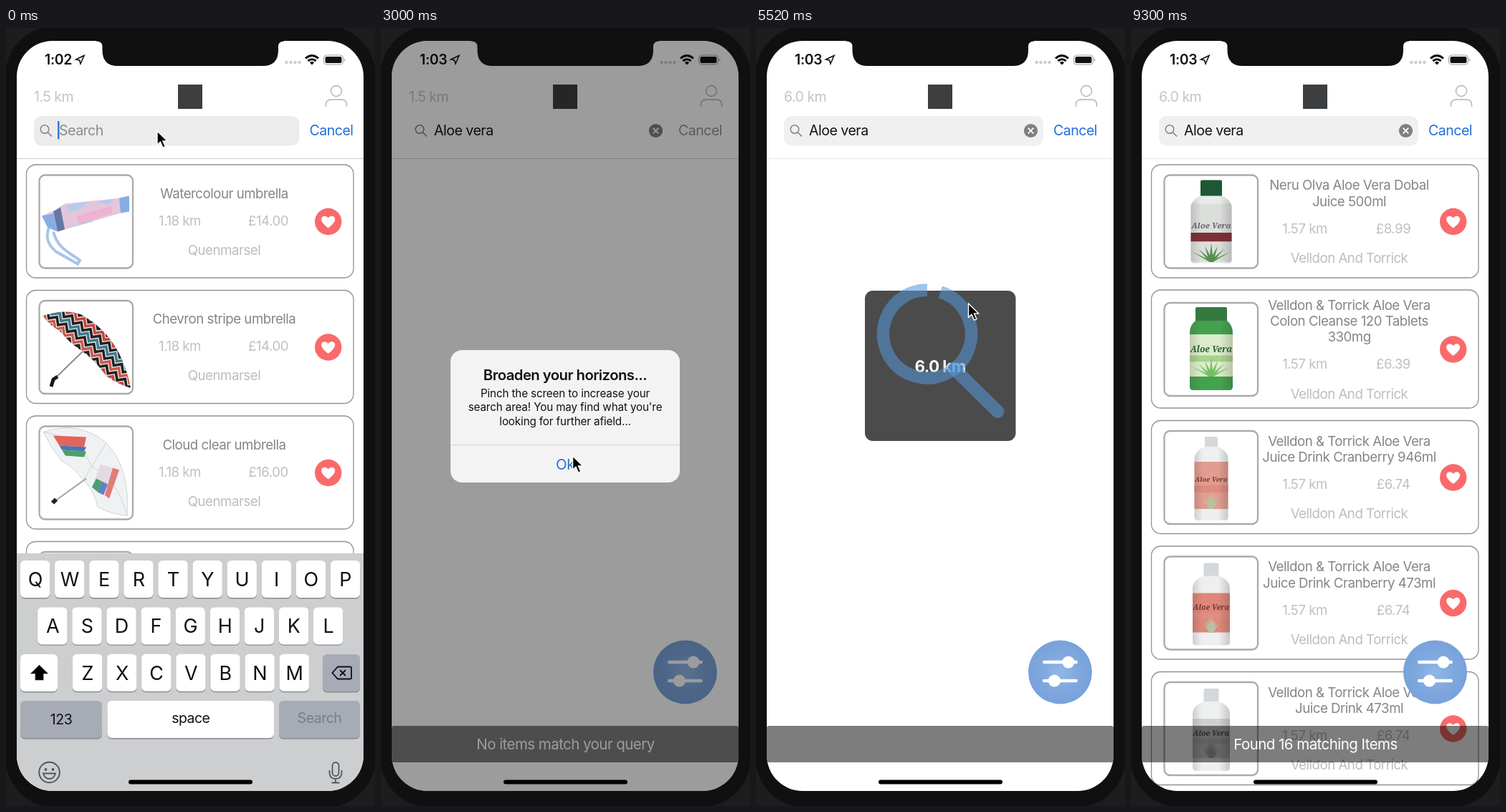
An HTML page with a canvas for the animation above (9360 ms loop, 515 px wide and 1087 px high).

```html
<!DOCTYPE html>
<html lang="en">
<head>
<meta charset="utf-8">
<title>Local stock search</title>
<style>
html, body { margin: 0; width: 100%; height: 100%; overflow: hidden; background: #1c1d1d; }
canvas { display: block; width: 515px; height: 1087px; }
</style>
</head>
<body>
<canvas id="stage" width="515" height="1087"></canvas>
<script>
const LOOP = 9360;
const c = document.getElementById('stage').getContext('2d');

// Drawing helpers
const clamp = (v, a = 0, b = 1) => Math.min(b, Math.max(a, v));
const ramp = (t, from, to) => clamp((t - from) / (to - from));
const ease = p => p * p * (3 - 2 * p);

function paint(shape, fill, stroke, width = 1) {
  if (fill) { c.fillStyle = fill; c.fill(shape); }
  if (stroke) { c.strokeStyle = stroke; c.lineWidth = width; c.stroke(shape); }
}
function box(x, y, w, h, r, fill, stroke, width) {
  const p = new Path2D();
  p.roundRect(x, y, w, h, r);
  paint(p, fill, stroke, width);
}
function dot(x, y, r, fill, stroke, width) {
  const p = new Path2D();
  p.arc(x, y, r, 0, Math.PI * 2);
  paint(p, fill, stroke, width);
}
function path(d, fill, stroke, width) { paint(new Path2D(d), fill, stroke, width); }
function text(s, x, y, size, color, align = 'center', weight = 400, track = -.027, family = 'Inter, sans-serif') {
  c.font = `${weight} ${size}px ${family}`;
  c.letterSpacing = `${track * size}px`;
  c.textAlign = align;
  c.fillStyle = color;
  c.fillText(s, x, y);
}
function at(x, y, draw, scale = 1) {
  c.save();
  c.translate(x, y);
  c.scale(scale, scale);
  draw();
  c.restore();
}
function fade(alpha, draw) {
  if (alpha <= 0) return;
  c.save();
  c.globalAlpha = alpha;
  draw();
  c.restore();
}

// Product pictures, drawn around the centre of their frame
function foldedUmbrella() {
  path('M-52 8C-58 24-52 34-42 42L-12 59L-9 54C-22 44-40 38-46 14', null, '#a9c4ea', 4);
  path('M-62-8L-44-16L-30-25L48-33L60-36V-14L48-12L-40 14L-54 8Z', '#e3c6dc');
  path('M-62-8L-46-11L-40 14L-54 8ZM46-33L60-36V-14L48-12Z', '#86aee2');
  path('M-46-14L-36-20L-30 11L-40 14Z', '#6577a6');
  path('M-28-22L2-28L-8-18L-24-14ZM14-27L40-32L32-24ZM-22 8L4-2L10 0Z', '#b3cbec');
  path('M-14-8L36-22V-12L-10 4Z', '#edb3d1');
}
function stripedUmbrella() {
  path('M-4 5L-42 42', null, '#8c8c8c', 2);
  path('M-40 41L-46 45L-49 55', null, '#181818', 5);
  c.save();
  const canopy = new Path2D('M-61-44Q-30-54-8-46Q48-16 62 57Q40 50 28 40Q10 16-5 6Q-26-8-36-22Q-50-30-61-44Z');
  paint(canopy, '#eee8e6');
  c.clip(canopy);
  c.rotate(Math.PI / 5);
  const colors = ['#222', '#c6453d', '#222', '#3d7a90', '#222', '#d0574a'];
  for (let i = 0; i < 20; i++) {
    let d = `M-90 ${i * 7 - 80}`;
    for (let k = 1; k < 24; k++) d += `L${k * 8 - 90} ${i * 7 - 80 + k % 2 * 8}`;
    path(d, null, colors[i % 6], 3.6);
  }
  c.restore();
}
function clearUmbrella() {
  path('M-60-57Q-10-74 28-42Q62-6 57 60Q36 58 16 48Q12 26-4 10Q-22-12-34-16Q-50-36-60-57Z', '#f0f1f2', '#d2d4d6', 1);
  path('M0 8L-42 38', null, '#a0a0a0', 2);
  path('M-42 37L-47 42', null, '#222', 6);
  path('M-60-57Q-10-50 8-8M28-42L-4 10M8-8Q44 10 57 60', null, '#cfd1d4', 1);
  [['#e2655d', 0, 14], ['#4a74b8', 14, 6], ['#4ba06c', 20, 8]].forEach(([color, y, h]) =>
    path(`M${-46 + y * .6} ${y - 52}L0 ${y - 50}L-3 ${y + h - 50}L${-46 + (y + h) * .6} ${y + h - 52}Z`, color));
  path('M20-12L46-4L32 36L8 20Z', '#e4dbe2');
  path('M14 8L22 12L16 27L8 20Z', '#4ba06c');
  path('M22 12L30 16L24 31L16 27Z', '#5e83c0');
  path('M37-7L46-4L32 36L26 31Z', '#df7d78');
}
function bottle({ w, top, bottom, cap, capW, capH, body, label, from, to, band, leaf, spread, ink }) {
  const shoulder = top + capH, r = w / 2, size = to - from;
  const shade = c.createLinearGradient(-r, 0, r, 0);
  [[0, .16], [.25, 0], [.7, 0], [1, .2]].forEach(([x, a]) => shade.addColorStop(x, `rgba(40,40,40,${a})`));
  box(-capW / 2, top, capW, capH + 2, 2, cap);
  const shell = new Path2D(`M${-capW / 2} ${shoulder}Q${-r} ${shoulder + 6} ${-r} ${shoulder + 17}V${bottom - 5}Q${-r} ${bottom} ${5 - r} ${bottom}H${r - 5}Q${r} ${bottom} ${r} ${bottom - 5}V${shoulder + 17}Q${r} ${shoulder + 6} ${capW / 2} ${shoulder}Z`);
  paint(shell, body);
  box(-r, from, w, size, 1, label);
  box(-r, from + size * .5, w, size * .15, 0, band);
  for (let k = -3; k < 4; k++)
    path(`M-3 ${to}L${k * spread} ${to - 26 + Math.abs(k) * 4}L3 ${to}Z`, leaf);
  paint(shell, shade);
  text('Aloe Vera', 0, from + size * .43, w * .2, ink, 'center', 'italic 700', 0, 'Noto Serif, serif');
}
const juice = { w: 47, top: -57, bottom: 60, cap: '#d5d8da', capW: 18, capH: 14, body: '#eeefef', label: '#e39c90', from: -22, to: 44, band: '#e08c80', leaf: '#b9c0a0', spread: 4, ink: '#6f3b38' };
const smallJuice = { ...juice, w: 52, top: -56, bottom: 59, capW: 21, capH: 18, label: '#df877a', from: -14, to: 41 };
const bottles = [
  { w: 57, top: -58, bottom: 58, cap: '#1d5734', capW: 30, capH: 22, body: '#e9ebeb', label: '#dcdedc', from: -25, to: 56, band: '#7d3038', leaf: '#56904c', spread: 9, ink: '#666' },
  { w: 60, top: -59, bottom: 57, cap: '#35793f', capW: 44, capH: 19, body: '#43a24e', label: '#dcecca', from: -21, to: 38, band: '#a9d18f', leaf: '#74bf62', spread: 9, ink: '#2c5a32' },
  juice, smallJuice,
  { ...smallJuice, label: '#cfd0cf', band: '#c4c4c4', leaf: '#a4a8a2', ink: '#555' }
].map(b => () => bottle(b));

// Lists of cards
const umbrella = (name, price, art, i) =>
  ({ y: 191 + i * 175.5, h: 158, lines: [name + ' umbrella'], km: '1.18', price, shop: 'Quenmarsel', art });
const umbrellas = [
  umbrella('Watercolour', '14.00', foldedUmbrella, 0),
  umbrella('Chevron stripe', '14.00', stripedUmbrella, 1),
  umbrella('Cloud clear', '16.00', clearUmbrella, 2),
  umbrella('Plain black', '14.00', foldedUmbrella, 3)
];
const own = 'Velldon & Torrick Aloe Vera';
const results = [
  [191, 158, '8.99', 'Neru Olva Aloe Vera Dobal', 'Juice 500ml'],
  [366, 165, '6.39', own, 'Colon Cleanse 120 Tablets', '330mg'],
  [548.5, 158, '6.74', own, 'Juice Drink Cranberry 946ml'],
  [724, 158, '6.74', own, 'Juice Drink Cranberry 473ml'],
  [899.5, 158, '6.74', own, 'Juice Drink 473ml']
].map(([y, h, price, ...lines], i) =>
  ({ y, h, lines, km: '1.57', price, shop: 'Velldon And Torrick', art: bottles[i] }));

function card({ y, h, lines, km, price, shop, art }) {
  const mid = y + h / 2 + .5;
  box(28.5, y, 456.5, h, 13, '#fff', '#929292', 1.3);
  at(112, mid, art);
  box(46.5, mid - 65, 130.5, 130, 8, null, '#aaa', 2.3);
  let line = mid + 6.8 - (79.5 + 22.2 * (lines.length - 1)) / 2;
  lines.forEach((s, i) => text(s, 304.5, line + i * 22.2, 18.7, '#858585'));
  line += (lines.length - 1) * 22.2 + 38;
  text(km + ' km', 242.5, line, 18.7, '#c0c0c0');
  text('£' + price, 366, line, 18.7, '#c0c0c0');
  text(shop, 304.5, line + 41.3, 18.7, '#bdbdbd');
  dot(449.7, mid, 18.7, '#fa6a6a');
  at(449.7, mid + .5, () => path('M0 8.5C-6 4-9.5 0-9.5-4C-9.5-9-3-10 0-5.5C3-10 9.5-9 9.5-4C9.5 0 6 4 0 8.5Z', '#fff'));
}

function statusBar(t) {
  text(t < 1500 ? '1:02' : '1:03', 54, 51, 19.4, '#111', 'left', 600, -.015);
  path('M97.5 44L109 38.5L104 50L102.5 45Z', null, '#111', 1.6);
  for (let i = 0; i < 4; i++) dot(391.5 + i * 6, 48, 2.2, '#ccc');
  path('M418 42.5Q427 34.5 436 42.5M421.3 46Q427 41.5 432.7 46', null, '#111', 3);
  path('M423.8 48.2Q427 45.8 430.2 48.2L427 51.5Z', '#111');
  box(443.5, 38, 27, 13, 4, null, '#999', 1);
  box(445.5, 40, 23, 9, 2, '#111');
  path('M472 42.5Q475 44.5 472 46.5Z', '#999');
}

function header(t, km, query) {
  const shift = 8.5 * (1 - ease(ramp(t, 0, 180)));
  const covered = t > 1620 && t < 3120;
  text(km + ' km', 39, 102.5, 19.6, '#c4c4c4', 'left');
  box(240, 79, 34, 34, 0, '#3c3e40');
  dot(461, 88, 7.5, null, '#b4b4b4', 1.4);
  path('M446.5 110V107Q446.5 100 454 100H468Q475.5 100 475.5 107V110', null, '#b4b4b4', 1.4);
  if (!covered) box(39, 123, 362 + shift, 41.5, 11, t < 3600 ? '#ececec' : '#f0f0f0');
  dot(54, 141.5, 5.8, null, '#858585', 1.5);
  path('M58.5 146L64 151.5', null, '#858585', 1.7);
  text('Cancel', 415 + shift, 150, 19.6, covered ? '#949494' : '#2070dc', 'left');

  text(query || 'Search', 74, 150, 19.6, query ? '#111' : '#8c8c8e', 'left');
  if (t < 1440) box(query ? 74 + c.measureText(query).width - .5 : 72, 130, 2.5, 25.5, 1, '#3478d8');
  if (query) {
    dot(383.5, 143.5, 9.6, '#808080');
    path('M379.7 139.7L387.3 147.3M387.3 139.7L379.7 147.3', null, '#fff', 1.8);
  }
  path('M15 182.5H499', null, t < 3600 ? '#cfcfcf' : '#e6e6e6', 1);
}

function key(x, y, w, label, fill = '#fff', color = '#111', size = 19.5, base = 33) {
  box(x, y + 1.4, w, 52, 6, '#898b90');
  box(x, y, w, 52, 6, fill);
  if (label) text(label, x + w / 2, y + base, size, color);
}
function keyboard(offset, typed) {
  const grey = '#a7abb6';
  c.save();
  c.translate(0, offset);
  box(15, 714, 484, 400, 0, '#cdced0');
  [['qwertyuiop', 20], ['asdfghjkl', 44.2], ['zxcvbnm', 93]].forEach(([row, x], r) =>
    [...row].forEach((ch, i) =>
      key(x + i * 48.1, 724 + r * 65.4, 41.3, typed ? ch : ch.toUpperCase(), '#fff', '#111', typed ? 28 : 27, typed ? 33 : 36)));
  key(20, 855, 52, '', typed ? grey : '#fff');
  path('M46.5 871L57 881.5H51.5V890.5H41.5V881.5H36Z', typed ? null : '#000', '#111', 1.7);
  key(442, 855, 52, '', grey);
  path('M463 872.5H480.5Q482 872.5 482 874V888Q482 889.5 480.5 889.5H463L455.5 881ZM466 877L474 885M474 877L466 885', null, '#111', 1.8);
  key(20, 920, 114, '123', grey);
  key(141.5, 920, 232.5, 'space', '#fff', '#111', 19.5, 31);
  key(381, 920, 113, 'Search', typed ? '#007aff' : grey, typed ? '#fff' : '#787c84', 19.5, 31);
  dot(60.5, 1020, 14.3, null, '#55575a', 2);
  dot(55.5, 1016, 1.9, '#55575a');
  dot(65.5, 1016, 1.9, '#55575a');
  path('M52 1021.5H69Q67 1029 60.5 1029Q54 1029 52 1021.5Z', null, '#55575a', 1.8);
  box(455.5, 1006, 9, 19, 4.5, null, '#55575a', 1.8);
  path('M451.5 1017V1021Q452 1029 460 1029Q468 1029 468.5 1021V1017M460 1029V1034M454.5 1034.5H465.5', null, '#55575a', 1.8);
  c.restore();
}

function filterButton() {
  const g = c.createRadialGradient(424.5, 900, 4, 424.5, 900, 45);
  g.addColorStop(0, '#90b5e5');
  g.addColorStop(.5, '#7fa8df');
  g.addColorStop(1, '#78a2da');
  dot(424.5, 900, 44.5, g);
  for (const [y, knob] of [[886, 436], [912, 416.5]]) {
    box(400, y - 2.3, 49, 4.6, 2.3, '#fff');
    dot(knob, y, 8.6, '#fff');
  }
}

function toast(t) {
  const message = t < 5300 ? 'No items match your query' : t < 6000 ? '' : 'Found 16 matching Items';
  fade(ramp(t, 1920, 2200), () => {
    box(15, 975, 484, 51, 3, 'rgba(0,0,0,.51)');
    text(message, 257.5, 1008, 20.5, '#fff');
  });
}

function rangePanel(t, km) {
  if (t >= 4200) fade(1 - ramp(t, 5520, 5800), () => {
    box(152, 367, 210.5, 210, 11, 'rgba(0,0,0,.71)');
    text(km + ' km', 257, 481, 22.5, '#fff', 'center', 700);
  });
  if (t > 5460 && t < 6000) fade(1 - ramp(t, 5800, 6000), () => {
    const blue = 'rgba(85,150,214,.56)', ring = new Path2D();
    ring.arc(239, 427.5, 61.5, -Math.PI / 2 + (t - 5460) / 1270 * Math.PI * 2, Math.PI * 1.5);
    paint(ring, null, blue, 17.5);
    c.lineCap = 'round';
    path('M276 475.5L337.5 536', null, blue, 18);
  });
}

function alertBox(t) {
  const enter = ease(ramp(t, 1620, 1860)), leave = ramp(t, 3120, 3345);
  const shown = enter * (1 - leave);
  if (!shown) return;
  box(15, 18, 484, 1048, 0, `rgba(0,0,0,${.39 * shown})`);
  fade(shown, () => at(257, 542.5, () => {
    c.translate(-257, -542.5);
    box(97, 450, 320, 185, 16, '#f3f3f3');
    text('Broaden your horizons...', 257, 492, 20.3, '#111', 'center', 600);
    ['Pinch the screen to increase your', "search area! You may find what you're", 'looking for further afield...']
      .forEach((s, i) => text(s, 257, 516.3 + i * 19.1, 15.2, '#111', 'center', 400, -.008));
    path('M97 582.5H417', null, '#d2d2d2', 1);
    text('Ok', 257, 616.5, 20.5, '#2c72cf');
  }, 1 + .15 * (1 - enter) - .021 * leave));
}

// Pointer stops: time, x, y
const stops = [[0, 211, 144], [2340, 211, 144], [2940, 267.5, 598], [3420, 267.5, 598], [4200, 296.5, 385],
  [5580, 296.5, 385], [6300, 301.5, 321], [6840, 301.5, 321], [7320, 306, 1100], [LOOP, 306, 1100]];
function pointer(t) {
  const i = stops.findIndex(s => s[0] > t);
  const [t0, x0, y0] = stops[i - 1], [t1, x1, y1] = stops[i];
  const p = ease(ramp(t, t0, t1));
  at(x0 + (x1 - x0) * p, y0 + (y1 - y0) * p, () =>
    path('M0 0V17.5L4 13.8L7.2 21L10.3 19.6L7.2 12.6H12.8Z', '#000', '#fff', 1.3), 1.1);
}

function frame(t) {
  const km = (1.5 + 4.5 * ramp(t, 4260, 5220)).toFixed(1);
  const query = 'Aloe vera'.slice(0, clamp(Math.floor((t - 300) / 105) + 1, 0, 9));
  box(0, 0, 515, 1087, 0, '#1c1d1d');
  box(-1, -3, 517, 1092, 70, '#101010');
  c.save();
  const screen = new Path2D();
  screen.roundRect(15, 18, 484, 1048, 50);
  c.clip(screen);
  box(15, 18, 484, 1048, 0, '#fff');
  if (t < 1500) umbrellas.forEach(card);
  if (t >= 6000) results.forEach(card);
  header(t, km, query);
  statusBar(t);
  filterButton();
  toast(t);
  rangePanel(t, km);
  if (t < 1740) keyboard(20 * (1 - ease(ramp(t, 0, 180))) + 360 * ease(ramp(t, 1440, 1740)), query);
  alertBox(t);
  box(171, 1050.5, 173, 6, 3, '#000');
  c.restore();
  path('M126 17H388V18.5Q380 18.5 380 26V31Q380 53 358 53H156Q134.5 53 134.5 31V26Q134.5 18.5 126 18.5Z', '#101010');
  pointer(t);
}

const start = performance.now();
(function tick() {
  frame((performance.now() - start) % LOOP);
  requestAnimationFrame(tick);
})();
</script>
</body>
</html>
```
